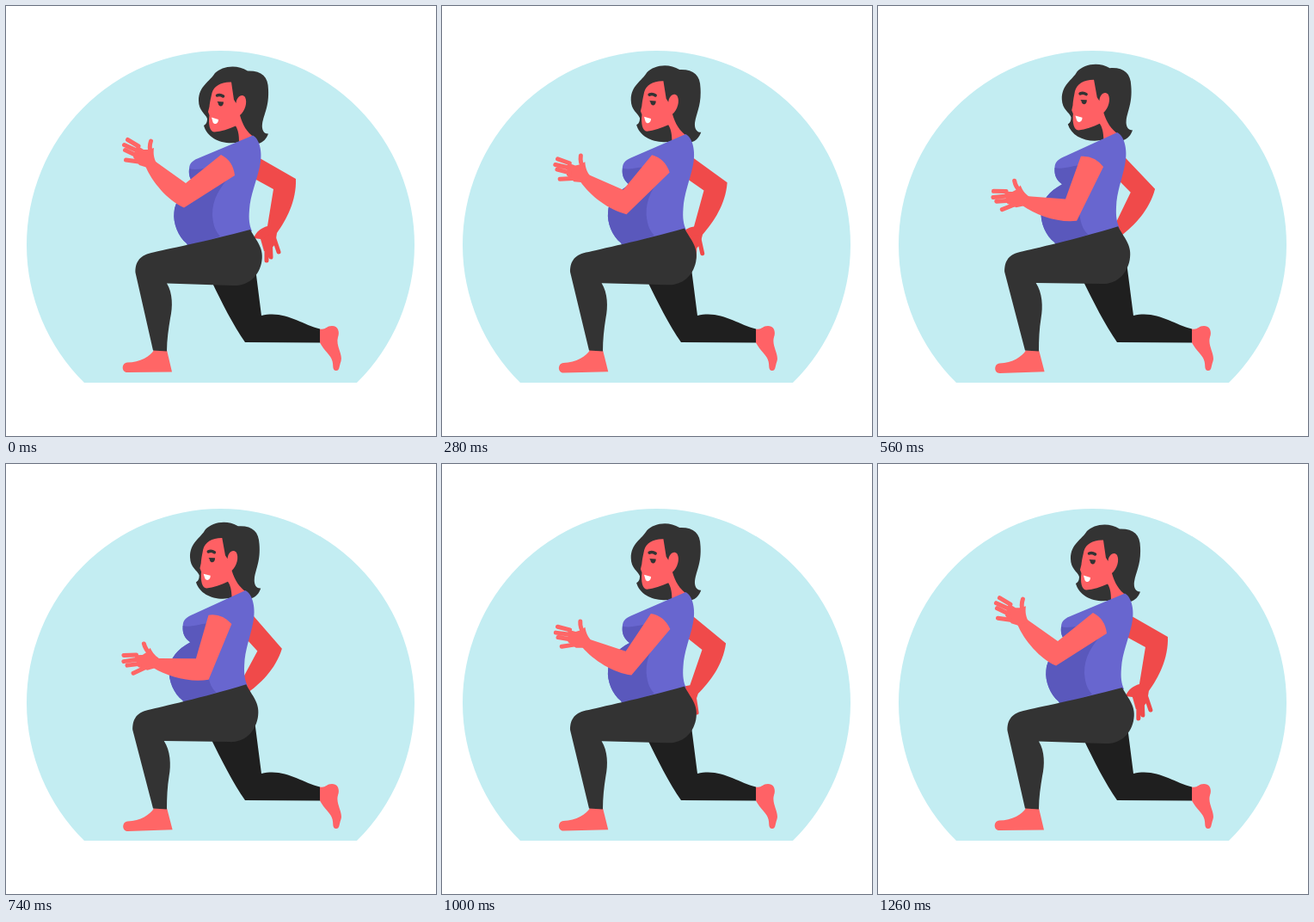
An HTML page that plays this animation: 500x500 px, repeating every 1280 ms.

```html
<!DOCTYPE html>
<html lang="en">
<head>
<meta charset="utf-8">
<title>Lunge workout</title>
<style>
  html, body { margin: 0; height: 100%; overflow: hidden; background: #fff; }
  svg { display: block; width: 100vw; height: 100vh; }
  .round { fill: none; stroke-linecap: round; stroke-linejoin: round; stroke-width: 5; }
</style>
</head>
<body>
<svg viewBox="0 0 500 500">
  <path fill="#c3edf2" d="M91 438A225.500 225.500 0 1 1 408 438Z"/>

  <g class="torso">
    <g id="backArm" fill="#f04a4a" stroke="#f04a4a">
      <path stroke="none" d="M280 168L296 177.500L337 201C338 226 326 249 315 264L313 277L306 285L300 285L296 271L288 270C291 262 297 258 304 256L311 213L280 196Z"/>
      <path class="round" d="M311 268L317 286M307 268L308 292M303 270L303 296"/>
    </g>
  </g>

  <path id="backLeg" fill="#1f1f1f"/>
  <path fill="#ff6266" d="M365 375.500C372 377 372 372 379 372C387 372 388 380 386 385C383 395 392 405 389.500 413C387 420 388 424 384 424C379 424 381 418 379.500 413C378 406 370 401 365 391.500Z"/>
  <path id="frontFoot" fill="#ff6666" d="M172 400C168 407 156 414.500 141 414.500C134 415 134 426 141 426L193 425.500L187 400Z"/>

  <g class="torso">
    <path fill="#333" d="M281 75.500C268 67 251 70 243 78C237 88 224 93 224 110C224 122 232 125 234 131C234 136 232 138 230 139C234 154 252 162 271 158.500L293 160C299 159 303 154 305 148.500C300 149 297 144 298 137C300 125 306 117 305 97C305 82 297 75 281 75.500Z"/>
    <path fill="#ff6064" d="M262 88.500C250 88 242 93 239.500 101C238 108 237 112 236.500 117L235 123L236.500 127C235 138 237 146 242 146.500C250 146 259 143 267 139.500C270 144 271 150 271 158L289 153C280 147 275 138 272 127C278 122 281 112 278 106C274 101 268 106 267.500 113L265 109Z"/>
    <path class="round" stroke="#333" style="stroke-width:3.500" d="M245.500 104Q249 102.500 252.500 105"/>
    <path fill="#333" d="M245.500 111L253 111.500C253 118 247 118 246.500 112.500Z"/>
    <path fill="#fff" d="M239 129.500L247 132C247 137.500 242 138.500 240.500 135Z"/>

    <path fill="#6866cf" d="M287 150.500C296 155 298.500 173 295 187C291 205 284 220 283 237C282 248 283 255 286 262L212 280L210 276C200 268 194 252 195.500 240C196 227 206 216 221 208.500C215 204 212 198 213 190C213 182 218 179 226 176Z"/>
    <path fill="#5a58bc" d="M213 189C222 192 236 187 246 187L262 196C248 212 240 224 240 243C241 258 245 263 249 268L212 280L210 276C200 268 194 252 195.500 240C196 227 206 216 221 208.500C215 204 212 198 213 189Z"/>
  </g>

  <path id="frontLeg" fill="#333"/>

  <g class="torso">
    <g id="frontArm" fill="#ff6666" stroke="#ff6666">
      <path stroke="none" d="M250 173Q264 180 266 197L207 234.500C188 226 170 205 162 186L174 181L209 206Z"/>
      <g id="hand">
        <path stroke="none" d="M175 183C172 177 171 172 172 165L166 167L160 167L152 162L148 176L155 185L163 187.500Z"/>
        <path class="round" d="M154 163L141.500 155.500M152 168L137.500 161.500M152 174L138.500 167.500M154 181L139.500 179M168.500 172Q166 164 168.500 157"/>
      </g>
    </g>
  </g>
</svg>
<script>
const LOOP = 1280, STEP = 20;
const $ = id => document.getElementById(id);
const torsoParts = document.querySelectorAll('.torso');

// Each leg has a start pose and an end pose with matching commands.
const legs = {
  frontLeg: [
    'M284 260C291 273 301 282 297 299C293 317 279 326 263 325L187 322.5C194 334 194 350 191 363C189 375 187 388 187 401.5L171 400.5L150.5 310C150 300 154 290 169 287C185 283 232 274 284 260Z',
    'M279 256C285.5 269 296 278 292.5 295C289 313 276 323.5 260 323L183.5 322C191 333 192 350 189.5 363C187.5 375 187 388 187 401.5L171 400.5L147 309C147 299 150 289 165 286C181 282 227 272 279 256Z'
  ],
  backLeg: [
    'M239 320C251 345 264 371 278 391L365 391.5L365 375.5C343 370 324 353.5 297 360L290 305Z',
    'M237 317C251 345 264 371 278 391L365 391.5L365 375.5C343 370 324 353.5 297 360L289 298Z'
  ]
};

function blend([from, to], k) {
  const ends = to.match(/[\d.]+/g);
  let i = 0;
  return from.replace(/[\d.]+/g, n => +n + (ends[i++] - n) * k);
}

// Smooth swing 0 -> 1 -> 0 that peaks at the given time.
function swing(t, peak) {
  const u = t < peak ? t / peak : (LOOP - t) / (LOOP - peak);
  return (1 - Math.cos(Math.PI * u)) / 2;
}

const setTransform = (el, value) => el.setAttribute('transform', value);

function draw(now) {
  const t = Math.floor((now % LOOP) / STEP) * STEP;
  const body = swing(t, 640), arms = swing(t, 720);

  for (const part of torsoParts)
    setTransform(part, `translate(${-5.4 * body} ${-3.6 * body}) rotate(${-2 * body} 283 260)`);
  for (const id in legs) $(id).setAttribute('d', blend(legs[id], body));

  setTransform($('frontFoot'), `rotate(${-1.5 * body} 180 401)`);
  setTransform($('backArm'), `rotate(${21 * arms} 282 184)`);
  setTransform($('frontArm'), `rotate(${-33.3 * arms} 254.5 186.7)`);
  setTransform($('hand'), `rotate(${2 * arms} 167 183)`);
}

function tick() {
  draw(performance.now());
  requestAnimationFrame(tick);
}
tick();
</script>
</body>
</html>
```
